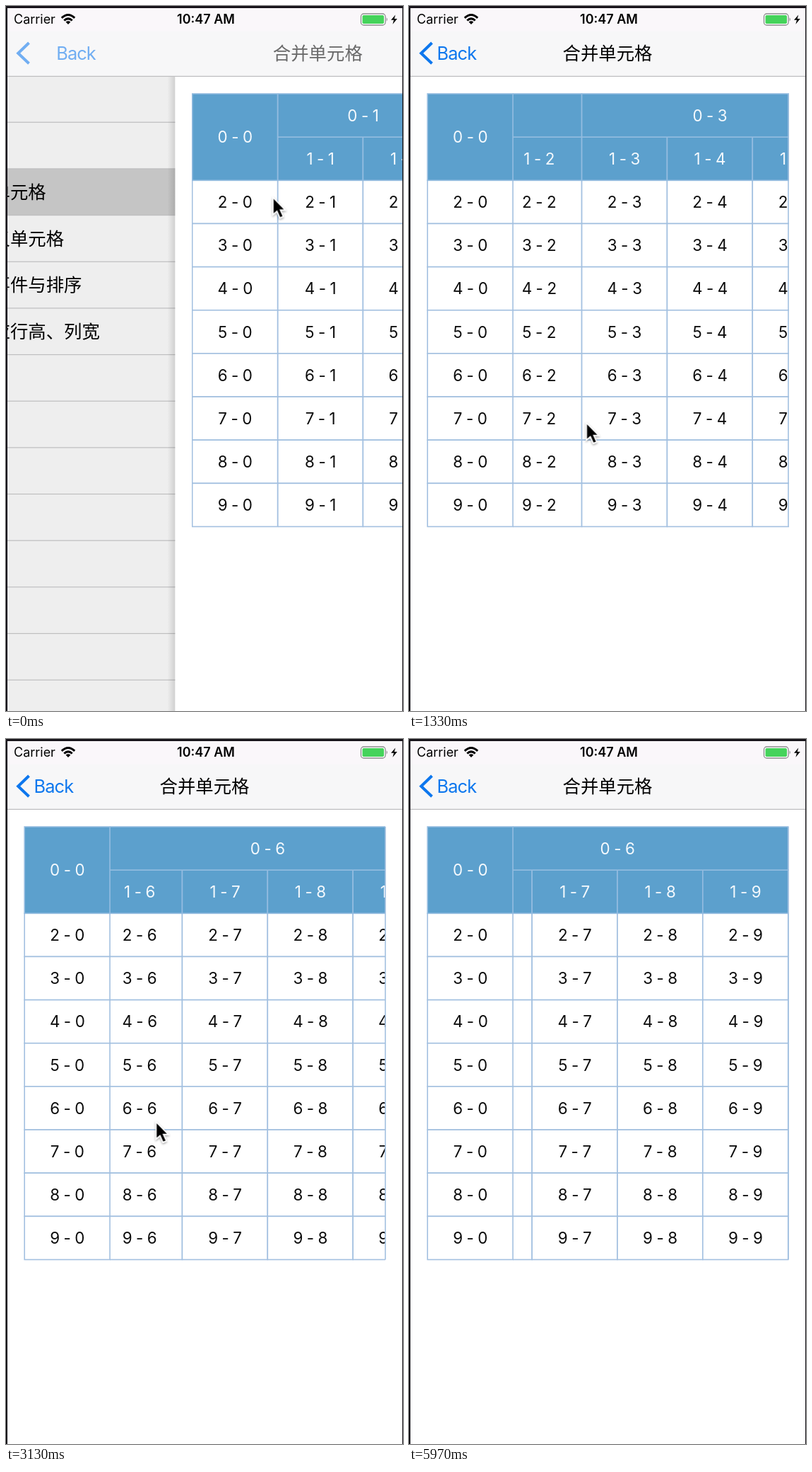
Write an HTML page that moves like this. It is 562 px wide and 996 px high and loops after 6010 ms.

```html
<!DOCTYPE html>
<html lang="zh">
<head>
<meta charset="utf-8">
<title>合并单元格</title>
<style>
  /* share of the push transition still to run, 1 at the loop start */
  @property --rest { syntax: "<number>"; inherits: true; initial-value: 0; }

  html, body { margin: 0; width: 100%; height: 100%; overflow: hidden; background: #fff; }
  svg { display: block; }
  #stage { width: 562px; height: 996px; animation: push 6010ms linear infinite; }
  text { font: 25.4px Inter, "Noto Sans CJK SC", "Noto Sans CJK", sans-serif; }

  #list  { transform: translateX(calc(var(--rest) * 72px - 168px)); }
  #dim   { opacity: calc(var(--rest) * .067); }
  #page  { transform: translateX(calc(var(--rest) * 240px)); }
  #title { transform: translateX(calc(var(--rest) * 162px)); font-weight: 500; }
  #back  { transform: translateX(calc(var(--rest) * 32px)); letter-spacing: -.9px; }
  .fade  { opacity: calc(1 - var(--rest) * .43); }
  .status { font-size: 18px; }

  .cell { fill: #fff; stroke: #a3c0e0; stroke-width: 1.6; }
  .head { fill: #5ca0cd; stroke: #94bce0; }
  .label { font-size: 22.4px; letter-spacing: -.4px; text-anchor: middle; fill: #0c0c0c; }
  .head + .label { fill: #f4f9fd; }

  #scroll { animation: scroll 6010ms linear infinite; }
  #cursor { animation: cursor 6010ms linear infinite; }

  @keyframes push {
    0% { --rest: 1; }
    .5% { --rest: .687; }
    1% { --rest: .46; }
    1.66% { --rest: .262; }
    2.5% { --rest: .125; }
    3.33% { --rest: .0584; }
    4.49% { --rest: .0194; }
    6.16% { --rest: .0039; }
    9.98%, 100% { --rest: 0; }
  }
  @keyframes scroll {
    0%, 17.47% { transform: translateX(0); }
    22.13% { transform: translateX(-143.5px); }
    23.63% { transform: translateX(-205px); animation-timing-function: cubic-bezier(.2, .52, .5, 1); }
    36.11% { transform: translateX(-381px); }
    42.43% { transform: translateX(-381px); animation-timing-function: cubic-bezier(.5, .1, .7, .5); }
    52.08% { transform: translateX(-622px); }
    53.91%, 100% { transform: translateX(-698px); }
  }
  @keyframes cursor {
    0% { transform: translate(377px, 269px); }
    6.16% { transform: translate(429px, 472px); }
    14.98% { transform: translate(425px, 570px); }
    17.47% { transform: translate(395px, 582px); }
    22.13% { transform: translate(251px, 588px); }
    23.63% { transform: translate(190px, 590px); }
    24.96% { transform: translate(175px, 588px); animation-timing-function: ease-in-out; }
    31.61% { transform: translate(420px, 565px); }
    36.11% { transform: translate(451px, 561px); }
    42.43% { transform: translate(451px, 561px); animation-timing-function: cubic-bezier(.5, .1, .7, .5); }
    52.08% { transform: translate(212px, 540px); }
    52.58% { transform: translate(200px, 540px); }
    54.24% { transform: translate(440px, 528px); }
    63.23% { transform: translate(460px, 525px); }
    69.88% { transform: translate(440px, 560px); }
    74.88% { transform: translate(430px, 500px); }
    77.7% { transform: translate(205px, 218px); }
    79.87% { transform: translate(40px, 72px); opacity: 1; }
    81.53% { transform: translate(40px, 72px); opacity: 1; animation-timing-function: step-start; }
    81.6%, 100% { transform: translate(40px, 72px); opacity: 0; }
  }
</style>
</head>
<body>
<svg id="stage" viewBox="0 0 562 996">
  <defs>
    <linearGradient id="shade">
      <stop offset="0" stop-opacity="0"/>
      <stop offset="1" stop-opacity=".13"/>
    </linearGradient>
    <clipPath id="window"><rect x="147.05" y="120" width="390" height="620"/></clipPath>
    <filter id="soft" x="-50%" y="-50%" width="200%" height="200%">
      <feDropShadow dx="0" dy="1.5" stdDeviation="1.5" flood-opacity=".4"/>
    </filter>
  </defs>

  <rect width="562" height="996" fill="#fff"/>
  <g id="list"></g>
  <rect id="dim" width="562" height="996"/>

  <g id="page">
    <rect x="-9" y="99" width="11" height="897" fill="url(#shade)"/>
    <rect x="2" y="99" width="560" height="897" fill="#fff"/>
    <g clip-path="url(#window)"><g id="scroll"></g></g>
    <g id="fixed"></g>
    <path d="M537 124V735.5" stroke="#a3c0e0" stroke-width="1.6"/>
  </g>

  <rect width="562" height="99" fill="#f7f7f8"/>
  <rect width="562" height="36" fill="#faf7fa"/>
  <path d="M0 99.3H562" stroke="#bebec0" stroke-width="1.3"/>

  <text class="status" x="11" y="25.3">Carrier</text>
  <text class="status" x="283" y="25.3" text-anchor="middle" font-weight="600" style="font-weight:600">10:47 AM</text>
  <g fill="none" stroke="#000" stroke-width="3">
    <path d="M78.8 16.8Q88 8.2 97.2 16.8"/>
    <path d="M82.3 20.5Q88 15.2 93.7 20.5"/>
  </g>
  <path d="M84.6 22.6Q88 19.8 91.4 22.6L88 26Z"/>
  <rect x="502.5" y="11" width="34.5" height="16" rx="3.8" fill="#fff" stroke="#8d8b8e" stroke-width="1.3"/>
  <rect x="504.5" y="13" width="30.5" height="12" rx="1.8" fill="#45d35b"/>
  <path d="M538.6 16.3Q541.2 19 538.6 21.8Z" fill="#8d8b8e"/>
  <path d="M551.3 12.5L545 19.8H549L547.4 25.8L553.8 18H549.7Z"/>

  <g class="fade">
    <path d="M32.5 52L17.2 66.8L32.5 81.3" fill="none" stroke="#0d77ee" stroke-width="4"/>
    <text id="back" x="39.5" y="75.7" fill="#0d77ee">Back</text>
    <text id="title" x="281" y="76.2" text-anchor="middle">合并单元格</text>
  </g>

  <g id="cursor">
    <path d="M.8 1V25.2L6.4 20.3L10.6 29.8L15.3 27.7L11.2 18.6H18.2Z" fill="#000" stroke="#fff" stroke-width="1.7" filter="url(#soft)"/>
  </g>

  <path d="M0 0H562V3H2V996H0Z" fill="#17141a"/>
  <rect x="561" width="1" height="996" fill="#17141a"/>
</svg>

<script>
  const $ = id => document.getElementById(id);

  function add(parent, name, attrs, label) {
    const el = document.createElementNS("http://www.w3.org/2000/svg", name);
    for (const key in attrs) el.setAttribute(key, attrs[key]);
    if (label) el.textContent = label;
    parent.append(el);
  }

  const LEFT = 26.2, TOP = 124, COL = 120.85, ROW = 61.15;

  function cell(row, col, rows = 1, cols = 1) {
    const parent = $(col ? "scroll" : "fixed");
    const x = LEFT + col * COL, y = TOP + row * ROW;
    const width = cols * COL, height = rows * ROW;
    add(parent, "rect", { class: row < 2 ? "cell head" : "cell", x, y, width, height });
    add(parent, "text", { class: "label", x: x + width / 2, y: y + height / 2 + 8.2 }, `${row} - ${col}`);
  }

  for (let row = 2; row < 10; row++)
    for (let col = 0; col < 10; col++) cell(row, col);
  for (let col = 1; col < 10; col++) cell(1, col);
  cell(0, 1, 1, 2);
  cell(0, 3, 1, 3);
  cell(0, 6, 1, 4);
  cell(0, 0, 2);

  const names = ["合并单元格", "自定义单元格", "点击事件与排序", "自适应行高、列宽"];
  const lineY = i => 98.6 + 65.66 * i;

  add($("list"), "rect", { y: lineY(2), width: 740, height: 65.66, fill: "#d3d3d3" });
  for (let i = 1; i < 14; i++)
    add($("list"), "rect", { x: 24, y: lineY(i) - .6, width: 716, height: 1.2, fill: "#cbcbcd" });
  names.forEach((name, i) => add($("list"), "text", { x: 26.5, y: lineY(i + 2.5) + 9.3 }, name));
</script>
</body>
</html>
```
